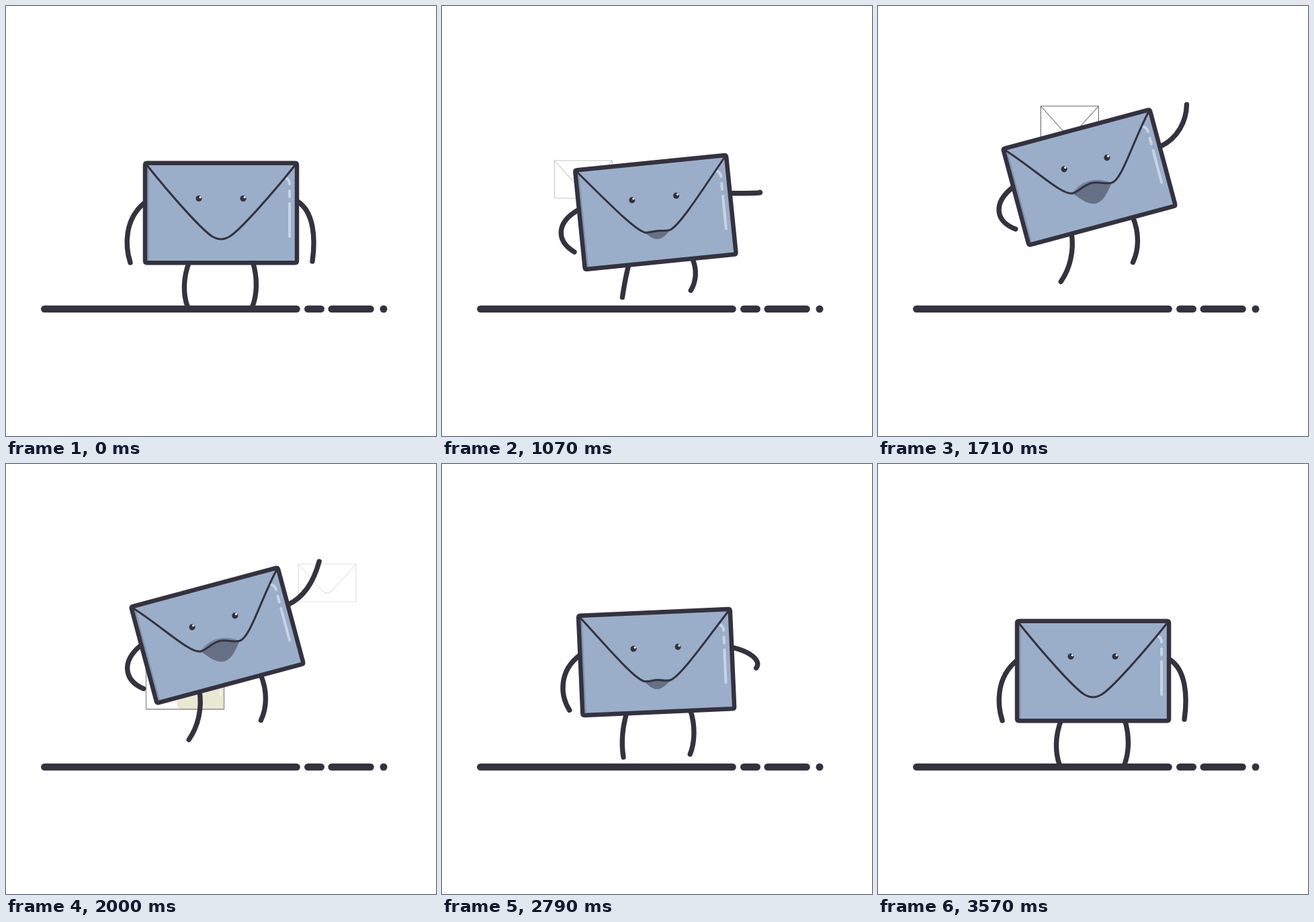
Write an HTML page with a canvas that moves like this. It is 640 px wide and 640 px high and loops after 3640 ms.

```html
<!DOCTYPE html>
<html lang="en">
<head>
<meta charset="utf-8">
<title>Jumping envelope</title>
<style>
  html, body { margin: 0; width: 100%; height: 100%; overflow: hidden; background: #fff; }
  canvas { display: block; width: 640px; height: 640px; }
</style>
</head>
<body>
<canvas id="stage" width="640" height="640"></canvas>
<script>
const ctx = document.getElementById('stage').getContext('2d');
const LOOP = 3640, START = 430, STEP = 71.4;
const INK = '#34323f', BLUE = '#9aaec9', FLOOR_Y = 447;

// Limbs relative to the middle of the body
const LEFT_ARM = {
  joint: [-114, -15],
  hang: [[-144, 10], [-143, 49], [-135, 74]],
  bent: [[-149, 0], [-152, 27], [-126, 46]]
};
const RIGHT_ARM = {
  joint: [114, -17],
  hang: [[138, -2], [141, 37], [136, 72]],
  bent: [[142, -22], [161, -43], [168, -67]]
};
const LEGS = [
  { hip: -47, foot: -50, swing: -31, bow: -9, bend: 19 },
  { hip: 47, foot: 47, swing: -17, bow: 8, bend: 3 }
];

// Mail flying past behind the body; x is the centre at the given time
const MAIL = [
  { time: 1072, x: 210, y: 258, draw: drawLetter },
  { time: 2000, x: 477.5, y: 177, draw: drawLetter },
  { time: 2000, x: 266, y: 327, draw: drawParcel }
];

const mix = (a, b, u) => a + (b - a) * u;

function ease(t, from, to) {
  const u = Math.min(1, Math.max(0, (t - from) / (to - from)));
  return u * u * (3 - 2 * u);
}

// Eases from 0 up to 1, holds, and eases back to 0
const pulse = (t, rise, top, fall, end) => ease(t, rise, top) * (1 - ease(t, fall, end));

function poseAt(t) {
  const crouch = pulse(t, 360, 715, 715, 1180) + pulse(t, 2750, 3070, 3070, 3570);
  const lean = pulse(t, 780, 1450, 2000, 3070) - .17 * crouch;
  const raise = Math.sqrt(Math.max(0, lean));
  return {
    lean, raise,
    x: 320 - 5.5 * lean,
    y: 308 + 7.5 * crouch - 53 * pulse(t, 1000, 1620, 2200, 3070),
    angle: -lean * Math.PI / 12,
    open: pulse(t, 700, 1600, 1950, 3450),
    curl: pulse(t, 800, 1100, 1700, 3400),
    tuck: pulse(t, 860, 1070, 1070, 1600),
    wave: 7 * raise * Math.sin((t - 1715) / 181)
  };
}

function stroke(path, width, color = INK) {
  ctx.lineWidth = width;
  ctx.strokeStyle = color;
  ctx.stroke(new Path2D(path));
}

function fill(path, color) {
  ctx.fillStyle = color;
  ctx.fill(new Path2D(path));
}

function dot(x, y, r, color) {
  ctx.fillStyle = color;
  ctx.beginPath();
  ctx.arc(x, y, r, 0, Math.PI * 2);
  ctx.fill();
}

function drawLetter() {
  fill('M-43-28h86v56h-86z', '#fff');
  stroke('M-43-28h86v56h-86zL-8 11Q0 19 8 11L43-28', 1.1);
}

function drawParcel() {
  fill('M-58-38h116v76h-116z', '#fff');
  fill('M-12-38H58V38H-6Q-12 36-12 30z', '#dcdcba');
  stroke('M-58-38h116v76h-116z', 1.8, '#77777d');
  stroke('M53 4V17', 2.5, '#fff');
}

function drawMail(t) {
  for (const { time, x, y, draw } of MAIL) {
    const cx = x + (t - time) * .675;
    const alpha = Math.min(1, (cx - 165) / 160, (505 - cx) / 170);
    if (alpha <= 0) continue;
    ctx.save();
    ctx.globalAlpha = alpha;
    ctx.translate(cx, y);
    draw();
    ctx.restore();
  }
}

// Feet follow the body but never pass through the floor
function drawLegs({ x, y, angle, lean, tuck }) {
  const cos = Math.cos(angle), sin = Math.sin(angle);
  const place = (px, py) => [x + px * cos - py * sin, y + px * sin + py * cos];
  for (const leg of LEGS) {
    const [hx, hy] = place(leg.hip, 72);
    const [fx, footY] = place(leg.foot + leg.swing * lean, 139 - 18 * tuck);
    const fy = Math.min(FLOOR_Y, footY), bow = leg.bow + leg.bend * lean;
    stroke(`M${hx} ${hy}C${mix(hx, fx, 1 / 3) + bow} ${mix(hy, fy, .38)} `
      + `${mix(hx, fx, 2 / 3) + bow * .8} ${mix(hy, fy, .74)} ${fx} ${fy}`, 7.4);
  }
}

function drawArm({ joint, hang, bent }, amount, elbow = 0, wave = 0) {
  const [near, far, tip] = hang.map((p, i) => p.map((v, k) => mix(v, bent[i][k], amount)));
  far[0] += elbow;
  tip[0] += wave;
  stroke(`M${joint}C${near} ${far} ${tip}`, 7.4);
}

function drawFace(open) {
  const shut = 1 - open;
  const lipX = 13 + 17 * open, lipY = 35 - 18.5 * open, top = 39 - 30 * open;
  const innerX = lipX - 5 - 5 * open, innerY = lipY + 3 * shut, midX = 5 + 7 * open;
  const lip = `C${-innerX} ${innerY} ${-midX} ${top} 0 ${top}`
    + `C${midX} ${top} ${innerX} ${innerY} ${lipX} ${lipY}`;
  const outerX = lipX + 16, outerY = lipY - 10 * shut, bendY = mix(-27, -33, open);

  const low = lipY + (40 - lipY) * .75, hump = top - 8 * open;
  fill(`M${-lipX} ${lipY}C-15 ${hump} 10 ${hump} ${lipX} ${lipY}z`, `rgba(85,95,118,${open * .5})`);
  if (open > 0) {
    fill(`M${-lipX} ${lipY}${lip}`
      + `C${lipX * .55} ${low} ${lipX * .3} 40 0 40`
      + `C${-lipX * .3} 40 ${-lipX * .55} ${low} ${-lipX} ${lipY}z`, '#667085');
  }
  stroke(`M-111-72C-75 ${bendY} ${-outerX} ${outerY} ${-lipX} ${lipY}${lip}`
    + `C${outerX} ${outerY} 75 ${bendY} 111-72`, 3);

  for (const x of [-33, 33]) {
    dot(x, -21.5, 4.6, INK);
    dot(x + 2.2, -23.3, 1.6, '#fff');
  }
}

function drawBody({ x, y, angle, open, curl, raise, wave }) {
  ctx.save();
  ctx.translate(x, y);
  ctx.rotate(angle);
  drawArm(LEFT_ARM, curl);
  drawArm(RIGHT_ARM, raise, 8 * Math.sin(raise * Math.PI), wave);

  const box = 'M-110-74.2H110Q113-74.2 113-71.2V71.2Q113 74.2 110 74.2'
    + 'H-110Q-113 74.2-113 71.2V-71.2Q-113-74.2-110-74.2z';
  fill(box, BLUE);
  stroke('M-108.5-66V70', 2, '#8393ad');
  stroke('M97-52Q102-49 102-43M102-33V-24M102-14V35', 4, '#c8d4e4');
  drawFace(open);
  stroke(box, 6.5);
  ctx.restore();
}

function drawFloor() {
  stroke('M57.3 451H432.5M449.3 451H468.7M484.7 451H542.5', 10.6);
  dot(562, 451, 5.5, INK);
}

function render(now) {
  const time = now % LOOP;
  const t = time < START ? 0 : START + STEP * Math.floor((time - START + 5) / STEP);
  const pose = poseAt(t);
  ctx.fillStyle = '#fff';
  ctx.fillRect(0, 0, 640, 640);
  drawMail(t);
  drawLegs(pose);
  drawBody(pose);
  drawFloor();
}

ctx.lineCap = ctx.lineJoin = 'round';
function tick() {
  render(performance.now());
  requestAnimationFrame(tick);
}
tick();
</script>
</body>
</html>
```
